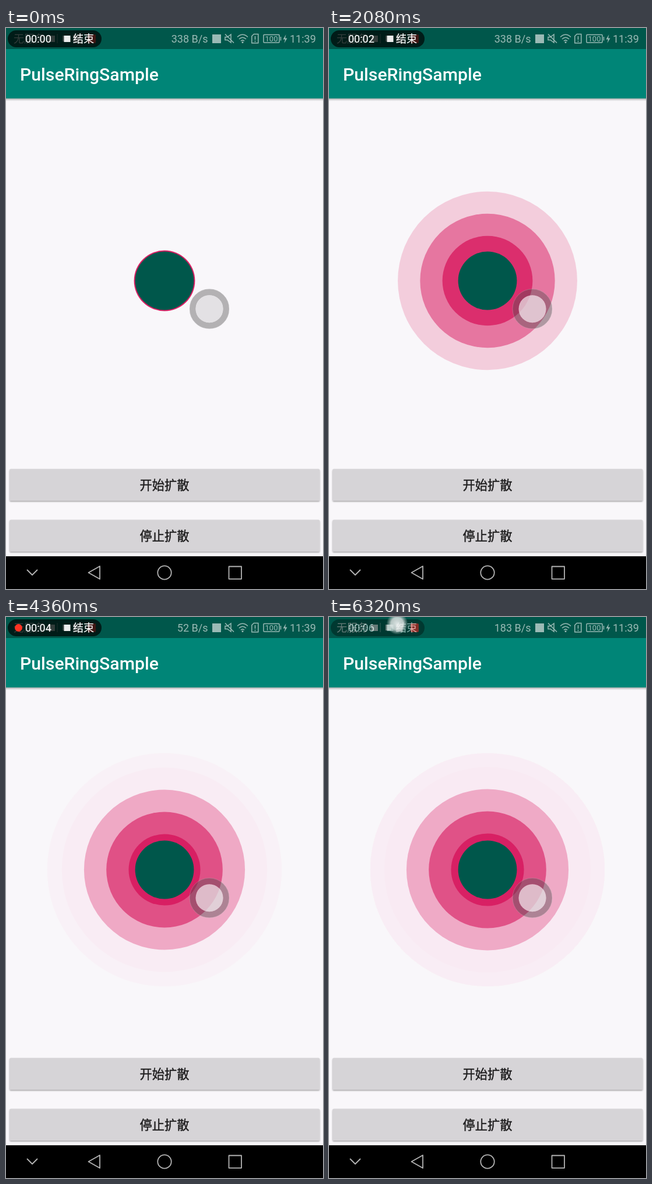
An HTML page that plays this animation: 544 by 960 pixels, repeating every 6.36 s.

```html
<!DOCTYPE html>
<html lang="zh-CN">
<head>
<meta charset="utf-8">
<title>Pulse rings</title>
<style>
  html, body { margin: 0; width: 100%; height: 100%; overflow: hidden; background: #f9f7fa; }
  svg { display: block; width: 544px; height: 960px; }
  text { font-family: Roboto, "Noto Sans CJK SC", "Noto Sans CJK", sans-serif; white-space: pre; }
  .title { font-size: 30.2px; font-weight: 500; fill: #fff; }
  .status text { font-size: 18px; fill: #9bbab5; }
  .pill text { font-size: 18px; fill: #fff; stroke: #fff; stroke-width: .2; }
  .button text { font-size: 21.2px; font-weight: 500; fill: #1f1e1f; stroke: #1f1e1f; stroke-width: .45; text-anchor: middle; }
  .button rect { fill: #d6d4d7; }
  .line { fill: none; stroke: #9bbab5; stroke-width: 1.5; }
  .nav { fill: none; stroke: #b4b4b4; stroke-width: 1.8; stroke-linejoin: round; }
</style>
</head>
<body>
<svg viewBox="0 0 544 960">
  <defs>
    <linearGradient id="shade" x2="0" y2="1">
      <stop offset="0" stop-color="#000" stop-opacity=".32"/>
      <stop offset="1" stop-color="#000" stop-opacity="0"/>
    </linearGradient>
    <radialGradient id="glow">
      <stop offset="0" stop-color="#f4f6f6" stop-opacity=".9"/>
      <stop offset=".6" stop-color="#e4e9e8" stop-opacity=".8"/>
      <stop offset=".75" stop-color="#b9c9c6" stop-opacity=".6"/>
      <stop offset="1" stop-color="#9fb5b1" stop-opacity=".1"/>
    </radialGradient>
    <filter id="drop" x="-5%" y="-20%" width="110%" height="150%">
      <feDropShadow dx="0" dy="1.6" stdDeviation="1.3" flood-color="#000" flood-opacity=".33"/>
    </filter>
  </defs>

  <rect width="544" height="960" fill="#f9f7fa"/>
  <g id="rings"></g>
  <ellipse cx="272" cy="432.5" rx="50.4" ry="50" fill="#00574b"/>

  <rect y="120" width="544" height="5" fill="url(#shade)"/>
  <rect y="36" width="544" height="84.500" fill="#008577"/>
  <rect width="544" height="36" fill="#00574b"/>
  <text class="title" x="24" y="90">PulseRingSample</text>

  <g class="status">
    <text x="13" y="25">无服务</text>
    <rect x="72" y="13" width="12" height="11" fill="#9bbab5"/>
    <path class="line" d="M88 10v16" opacity=".4"/>
    <rect x="97" y="13" width="10" height="10" fill="#9bbab5"/>
    <rect x="115" y="12" width="12" height="13" fill="#9bbab5"/>
    <rect x="140" y="11" width="14" height="15" rx="2" fill="#c8463c"/>

    <text id="speed" x="346.5" y="25" text-anchor="end"></text>
    <rect x="354" y="11" width="15" height="15" fill="#9bbab5"/>
    <path class="line" d="M376 15.500h4l6-4.500v14l-6-4.500h-4zM376 10.500l15 15"/>
    <path class="line" stroke-width="2" d="M397 15.500q9-8.500 18 0M400 19q6-5.500 12 0M403 22.200q3-2.600 6 0"/>
    <circle cx="406" cy="24.500" r="1.500" fill="#9bbab5"/>
    <path class="line" d="M421.800 14l3.500-3.500h7.500v15.200h-11zM427.500 14v6M427.500 21.700v2"/>
    <rect class="line" x="442" y="11.500" width="27" height="13.500" rx="1"/>
    <path class="line" d="M471.500 15v6.500"/>
    <text x="455.500" y="23" text-anchor="middle" style="font-size:13px">100</text>
    <path d="M480.500 11l-5 8.500h3.500l-1.500 6.500 5-8.500h-3.500z" fill="#9bbab5"/>
    <text x="487" y="25">11:39</text>
  </g>

  <g class="pill" id="pill">
    <rect x="3" y="4" width="161" height="29" rx="14.500" fill="#000" fill-opacity=".68"/>
    <circle id="dot" cx="21.500" cy="18.500" r="6.500" fill="#fb3323"/>
    <text id="clock" x="33" y="25"></text>
    <rect x="99.500" y="13" width="11" height="11" fill="#ececec"/>
    <text x="115" y="25">结束</text>
  </g>
  <circle id="touch" cx="117" cy="11.500" r="18" fill="url(#glow)"/>

  <circle cx="349" cy="480.700" r="28.800" fill="none" stroke="#4e4b4f" stroke-opacity=".41" stroke-width="10.600"/>
  <circle cx="349" cy="480.700" r="34" fill="none" stroke="#fff" stroke-opacity=".2"/>
  <circle cx="349" cy="480.700" r="23.500" fill="#dddbde" fill-opacity=".77"/>

  <g class="button">
    <rect x="6" y="754.500" width="532.500" height="54.500" rx="2.500" filter="url(#drop)"/>
    <text x="272" y="790">开始扩散</text>
    <rect x="6" y="841.500" width="532.500" height="54.500" rx="2.500" filter="url(#drop)"/>
    <text x="272" y="877">停止扩散</text>
  </g>

  <rect y="904" width="544" height="56" fill="#000"/>
  <g class="nav">
    <path d="M36 927l9 9 9-9M141.500 932l19.500-11v22z"/>
    <ellipse cx="272" cy="932" rx="11.700" ry="11.600"/>
    <rect x="382.500" y="921.500" width="21.500" height="21.300"/>
  </g>
</svg>
<script>
  const LOOP = 6360;
  const SCALE = 544 / 1080;
  const CORE = 100, SPREAD = 300, GAP = 76, MAX_RINGS = 10;

  // [ms, spread of the first ring in device pixels]
  const GROWTH = [[0, 4], [385, 4], [1400, 125.5], [2080, 205.5], [3440, 367.5],
                  [4360, 478], [5480, 615.5], [6320, 708], [6360, 713]];

  const $ = id => document.getElementById(id);
  const clamp01 = v => Math.min(1, Math.max(0, v));

  const rings = Array.from({ length: MAX_RINGS }, () => {
    const ring = document.createElementNS('http://www.w3.org/2000/svg', 'ellipse');
    ring.setAttribute('cx', 272);
    ring.setAttribute('cy', 432.5);
    return $('rings').appendChild(ring);
  });

  function growthAt(t) {
    const i = Math.max(1, GROWTH.findIndex(p => p[0] >= t));
    const [t0, a] = GROWTH[i - 1], [t1, b] = GROWTH[i];
    return a + (b - a) * (t - t0) / (t1 - t0);
  }

  function drawRings(t) {
    const head = growthAt(t);
    const newest = Math.floor(head / GAP);
    const oldest = Math.max(0, newest - 8);
    rings.forEach((ring, k) => {
      const i = oldest + k;
      const width = Math.min(SPREAD, head - i * GAP);
      const shown = i <= newest;
      ring.style.display = shown ? '' : 'none';
      if (!shown) return;
      const r = (CORE + width) * SCALE;
      const alpha = Math.max(2, 255 - width);
      ring.setAttribute('rx', r);
      ring.setAttribute('ry', r * 0.992);
      // the faintest rings lean towards a brighter pink
      ring.setAttribute('fill', alpha > 2 ? '#d81b60' : '#ff1a90');
      ring.setAttribute('fill-opacity', alpha / 255);
    });
  }

  function draw(t) {
    drawRings(t);
    const press = clamp01((t - 6180) / 120);
    const phase = t % 1000;
    $('clock').textContent = '00:0' + Math.floor(t / 1000);
    $('speed').textContent = (t < 3000 ? 338 : t < 6000 ? 52 : 183) + ' B/s';
    $('dot').style.display = phase >= 250 && phase < 750 && !press ? '' : 'none';
    $('pill').setAttribute('opacity', 1 - press * 0.5);
    $('touch').setAttribute('opacity', press);
  }

  const start = performance.now();
  function tick() {
    draw((performance.now() - start) % LOOP);
    requestAnimationFrame(tick);
  }
  tick();
</script>
</body>
</html>
```
